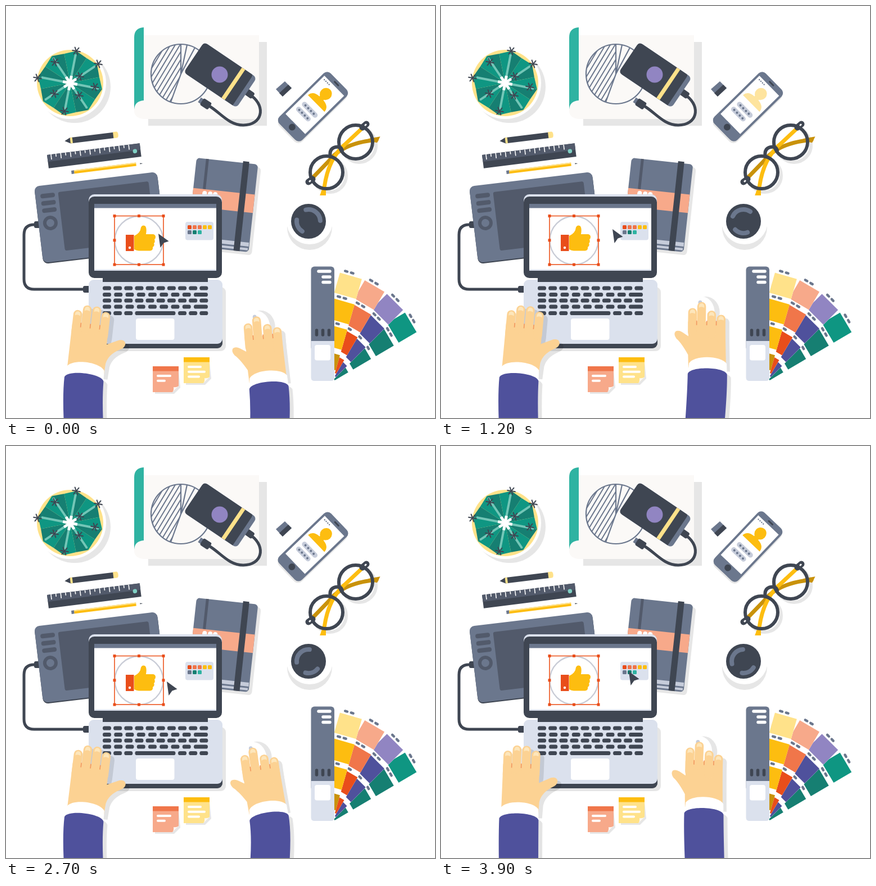
Recreate the animation shown at these times as an HTML page. Size 763 by 733 pixels, loop 4 s.

```html
<!DOCTYPE html>
<html lang="en">
<head>
<meta charset="utf-8">
<title>Designer's desk</title>
<style>
  html, body { margin: 0; width: 100%; height: 100%; overflow: hidden; background: #fff; }
  svg { display: block; }
  .dark { fill: #3f4652; } .slate { fill: #6b778d; } .mid { fill: #525a6b; }
  .light { fill: #dbe1ed; } .white { fill: #fff; } .gold { fill: #fdbd10; } .cream { fill: #ffe28a; }
  .red { fill: #e94e1b; } .orange { fill: #f0764a; } .salmon { fill: #f7a98a; }
  .shade { fill: #e6e6e6; } .skin { fill: #fcd293; } .navy { fill: #4f519c; } .lilac { fill: #9185c2; }
  .line { fill: none; stroke: #3f4652; stroke-linecap: round; }
</style>
</head>
<body>
<svg width="763" height="733" viewBox="0 0 763 733">
  <g id="plant"></g>

  <g id="paper">
    <path class="shade" d="M253 64H464V213H253Z"/>
    <path fill="#fbf9f7" d="M244 52H450V201H244Q228 199 228 186Q229 169 245 168Z"/>
    <path fill="#2fb3a2" d="M228 184V56Q228 39 245 38V168Q229 169 228 184Z"/>
    <g fill="none" stroke="#6b778d" stroke-width="2.2">
      <circle cx="311" cy="121" r="53"/>
      <clipPath id="slice"><path d="M311 121V68A53 53 0 0 0 293 171Z"/></clipPath>
      <path id="hatch" clip-path="url(#slice)" stroke-width="2"/>
      <path d="M293 171L311 121V68M311 121L322 69M311 121L336 74"/>
    </g>
  </g>

  <g id="drive">
    <path class="line" stroke-width="5" d="M437 160C463 180 455 212 422 212C396 212 382 190 360 177"/>
    <rect class="dark" x="-8" y="-6" width="16" height="12" rx="3" transform="translate(433 156) rotate(36)"/>
    <g transform="translate(355 174) rotate(33)">
      <rect class="slate" x="-13" y="-5" width="9" height="10"/>
      <rect class="dark" x="-8" y="-7" width="17" height="14" rx="3"/>
    </g>
    <g transform="translate(381 122) rotate(34)">
      <rect class="slate" x="-56" y="-32" width="113" height="65" rx="7"/>
      <path class="dark" d="M-49 -32H46Q49 -32 49 -26V33H-49Q-56 33 -56 26V-25Q-56 -32 -49 -32Z"/>
      <path class="cream" d="M25 -32H32V33H25Z"/>
    </g>
    <circle class="lilac" cx="380" cy="122" r="14.5"/>
  </g>
  <path class="slate" d="M496 134L508 146L492 161L480 148Z"/>
  <path class="dark" d="M508 146L492 161L486 155L502 140Z"/>

  <g id="phone">
    <rect x="-27" y="-61" width="58" height="128" rx="10" opacity=".1"/>
    <rect class="slate" x="-29" y="-64" width="58" height="128" rx="9"/>
    <rect class="white" x="-25" y="-53" width="50" height="97"/>
    <rect class="dark" x="-6" y="-60" width="12" height="3" rx="1.5"/>
    <circle class="dark" cy="52" r="6"/>
    <g id="avatar" class="gold">
      <ellipse cy="-32" rx="10.5" ry="11"/>
      <path d="M-5 -26H5V-21Q20 -20 21 -8H-21Q-20 -20 -5 -21Z"/>
    </g>
    <g id="fields"></g>
  </g>

  <g id="glasses" fill="none" stroke-linecap="round">
    <g stroke="#e6e6e6" stroke-width="6" transform="translate(6 6)">
      <circle cx="570" cy="296" r="29"/><circle cx="622" cy="242" r="30"/>
    </g>
    <circle class="white" cx="570" cy="296" r="28"/><circle class="white" cx="622" cy="242" r="29"/>
    <path stroke="#c9920a" stroke-width="7" d="M546 305L575 275Q598 244 659 238"/>
    <path stroke="#c9920a" stroke-width="4" d="M645 238L662 235L659 241Z"/>
    <path stroke="#fdbd10" stroke-width="7" d="M633 218L602 247Q570 275 565 333"/>
    <path stroke="#fdbd10" stroke-width="4" d="M567 318L561 335L567 335Z"/>
    <g stroke="#3f4652" stroke-width="6">
      <circle cx="570" cy="296" r="29"/><circle cx="622" cy="242" r="30"/>
      <path d="M577 268Q574 254 586 251Q596 249 598 257"/>
      <path stroke-width="11" d="M545 308L538 313M634 216L641 210"/>
    </g>
    <path stroke="#fff" stroke-width="3" d="M540 312l1 -1M639 212l1 -1"/>
  </g>

  <g id="cup">
    <circle class="shade" cx="540" cy="394" r="40"/>
    <circle class="white" cx="540" cy="383" r="41"/>
    <circle class="dark" cx="538" cy="383" r="31"/>
    <g id="lid" fill="none" stroke="#6b778d" stroke-width="8" stroke-linecap="round"></g>
  </g>

  <g transform="translate(152 234.5) rotate(-7)">
    <path class="dark" d="M-48 0L-38 -5H40V5.5H-38Z"/>
    <path class="cream" d="M-38 -5H-34V5.5H-38ZM39 -5.5H45Q48 -5 48 0Q48 5 45 5.5H39Z"/>
  </g>
  <g transform="translate(73 265) rotate(-7.2)">
    <path class="dark" d="M0 0H166V24H0Z"/><path class="mid" d="M0 0H166V12H0Z"/>
    <path id="ticks" stroke="#fff" stroke-width="1.6"/>
    <circle cx="156" cy="13" r="3.8" fill="#7fcfc3"/>
  </g>
  <g transform="translate(116 293) rotate(-7.2)">
    <path class="slate" d="M0 0H5V6H0Z"/><path class="gold" d="M5 0H116V6H5Z"/>
    <path class="cream" d="M5 0H116V2H5Z"/><path class="dark" d="M123 2L128 3L123 4Z"/>
  </g>

  <g id="tablet">
    <path class="line" stroke-width="5" d="M56 389H50Q32 389 32 407V486Q32 504 50 504H142"/>
    <rect class="dark" x="50" y="383" width="12" height="12" rx="3"/>
    <rect class="dark" x="137" y="498" width="14" height="12" rx="3"/>
    <g transform="translate(50 321) rotate(-6.8)">
      <rect class="dark" y="2" width="220" height="137" rx="9"/>
      <rect class="slate" width="220" height="137" rx="9"/>
      <rect class="mid" x="41" y="15" width="162" height="105" rx="3"/>
      <rect class="mid" x="9" y="15" width="26" height="8" rx="4"/>
      <rect class="mid" x="9" y="28" width="26" height="8" rx="4"/>
      <rect class="mid" x="9" y="41" width="26" height="8" rx="4"/>
      <circle cx="21" cy="68" r="10" fill="none" stroke="#525a6b" stroke-width="6"/>
    </g>
  </g>

  <g transform="translate(339 270) rotate(6.2)">
    <rect class="shade" x="8" y="5" width="108" height="157" rx="6"/>
    <rect class="slate" width="110" height="157" rx="6"/>
    <path fill="#c6ccda" d="M2 140H109V147H2ZM2 150H108V154H2Z"/>
    <path class="mid" d="M17 0H22V140H17Z"/>
    <path class="salmon" d="M0 54H110V87H0Z"/>
    <path fill="none" stroke="#fff" stroke-width="8" stroke-linecap="round" d="M21 61V66M31 61V66M40 61V66"/>
    <path class="dark" d="M83 -3H94V157H83Z"/>
  </g>

  <g id="laptop">
    <rect class="shade" x="160" y="500" width="231" height="114" rx="9"/>
    <rect class="dark" x="147" y="520" width="238" height="89" rx="9"/>
    <rect class="light" x="147" y="487" width="238" height="114" rx="9"/>
    <rect class="light" x="147" y="335" width="237" height="40" rx="10"/>
    <rect class="dark" x="147" y="339" width="237" height="145" rx="10"/>
    <path class="dark" d="M172 480H359V491H172Z"/>
    <path class="white" d="M157 352H374V471H157Z"/><path class="slate" d="M157 352H374V359.5H157Z"/>
    <path class="light" d="M157 468.5H374V471H157Z"/>
    <rect class="white" x="231" y="556" width="68.5" height="38" rx="4"/>
    <g id="keys" class="dark"></g>
    <circle cx="236.5" cy="417" r="43" fill="none" stroke="#c9ccd6" stroke-width="2.3"/>
    <path fill="none" stroke="#f0764a" stroke-width="2" d="M193 373.5H280V460H193Z"/>
    <g id="handles" class="red"></g>
    <path class="red" d="M213 407H227.500V436H213Z"/><circle class="white" cx="220" cy="430" r="2.2"/>
    <path class="gold" d="M228 409Q239 404 240 394Q242 389 247 391Q251 394 249 406H262Q266 407 266 411Q266 414 264 415Q266 420 263 422Q265 427 261 429Q262 435 256 435.5H236Q232 435 228 433Z"/>
    <rect class="light" x="319" y="384" width="50" height="32.5" rx="4"/>
    <g id="swatches"></g>
    <path id="cursor" class="dark" d="M0 0L18.500 13.500L9.500 16.500L3.500 25Z"/>
  </g>

  <g id="notes"></g>
  <g id="fan"></g>
  <g>
    <rect class="slate" x="542.5" y="463.5" width="41.5" height="150" rx="6"/>
    <path class="light" d="M542.5 596H584V661Q584 667 578 667H548.5Q542.5 667 542.5 661Z"/>
    <path fill="none" stroke="#fff" stroke-width="5.5" stroke-linecap="round" d="M556 472H576M564 482H576M564 491.5H576"/>
    <path class="line" stroke-width="5.5" d="M552.5 577V585M563.5 577V585M574.5 577V585"/>
    <rect class="white" x="549" y="603" width="28" height="27.5" rx="4"/>
  </g>
  <g id="arms"></g>
</svg>

<script>
const el = id => document.getElementById(id);
const range = (n, fn) => Array.from({ length: n }, (_, i) => fn(i)).join('');
const rect = (x, y, w, h, r, cls = '') =>
  `<rect class="${cls}" x="${x}" y="${y}" width="${w}" height="${h}" rx="${r}"/>`;
const path = (d, attrs) => `<path d="${d}" ${attrs}/>`;
const polar = (r, deg) => [r * Math.cos(deg * Math.PI / 180), r * Math.sin(deg * Math.PI / 180)];

// Cactus: eight lobes, each with a lit and a dark facet, a pale ridge and spines
const spines = [[125,80],[164,103],[158,144],[130,159],[104,187],[86,156],[56,128],[87,100],[131,125]];
const rim = i => polar(i % 2 ? 53 : 58, i * 22.5 - 79);
el('plant').innerHTML = `<circle class="shade" cx="122" cy="144" r="64"/><circle class="white" cx="114" cy="137" r="64"/>
  <circle class="cream" cx="114" cy="137" r="59"/><g transform="translate(114 137)">` +
  range(16, i => path(`M0 0L${rim(i)}L${rim(i + 1)}Z`, `fill="${i % 2 ? '#0f9682' : '#167f72'}"`)) +
  range(8, i => path(`M0 0L${polar(i % 2 ? 54 : 52, i * 45 - 79)}`, 'stroke="#73c6b7" stroke-width="4"')) +
  range(8, i => path(`M0 0L${polar(13, i * 45 - 79)}`, 'stroke="#fff" stroke-width="5"')) + '</g>' +
  range(spines.length, i => `<g transform="translate(${spines[i]})">` +
    range(3, k => path('M-7 0H7', `class="line" stroke-width="2" transform="rotate(${k * 60 + 10})"`)) + '</g>');

el('hatch').setAttribute('d', range(22, i => `M${195 + i * 8.5} 175l66 -110`));
el('ticks').setAttribute('d', range(17, i => `M${7 + i * 8.7} 0v${i % 2 ? 5 : 9}`));

el('fields').innerHTML = range(2, r => rect(-18 - r, 3.5 + r * 13.5, 36 - r * 3, 9, 4.5) +
  range(4, i => `<circle class="slate" cx="${-11 - r * 2 + i * 7}" cy="${8 + r * 13.5}" r="2"/>`)) +
  range(4, i => `<circle class="slate" cx="${-20 + i * 4}" cy="-48" r="1.2"/>`);
el('fields').setAttribute('fill', '#c6ccda');

const arc = (from, to) => path(`M${polar(21, from)}A21 21 0 0 1 ${polar(21, to)}`, '');
el('lid').innerHTML = arc(-185, -85) + arc(40, 105);

// Rows two and four end in a wide key, the last row has the space bar
el('keys').innerHTML = [502, 513.5, 524, 535, 546.5].map((y, r) => {
  const wide = r % 2, pitch = wide ? 20.25 : 19.15;
  return range(wide ? 9 : 10, i => {
    if (r == 4 && i > 3 && i < 7) return '';
    const w = r == 4 && i == 3 ? 72 : wide && i == 8 ? 25 : 15;
    return rect(172 + i * pitch, y - 3.6, w, 7.2, 3.4);
  });
}).join('');

el('handles').innerHTML = range(9, i => i == 4 ? '' :
  rect(190.5 + i % 3 * 43.5, 371 + Math.floor(i / 3) * 43.3, 5, 5, 0));
el('swatches').innerHTML = ['#e94e1b', '#f0764a', '#f0764a', '#fdbd10', '#fdbd10', '#6b778d', '#167f72', '#2fb3a2']
  .map((c, i) => `<rect x="${323 + i % 5 * 9}" y="${i < 5 ? 390 : 399}" width="7" height="7" rx="1.5" fill="${c}"/>`).join('');

const note = (x, y, body, strip, lines) => `<g transform="translate(${x} ${y})">
  <path class="shade" d="M4 8H46L49 38L38 49H4Z"/>
  <path class="${body}" d="M0 0H46V35L35 46H0Z"/><path class="${strip}" d="M0 0H46V8.5H0Z"/>
  <path fill="#fbf9f7" d="M46 35L35 46Q38 42 37 37Q42 38 46 35Z"/>` +
  lines.map((w, i) => path(`M9 ${17 + i * 8.7}h${w}`, 'stroke="#fff" stroke-width="4" stroke-linecap="round"')).join('') + '</g>';
el('notes').innerHTML = note(261, 641, 'salmon', 'orange', [22, 12]) + note(316, 625, 'cream', 'gold', [21, 28, 18]);

// Colour fan: four strips around one pivot, the steepest on top
const strips = [
  [59.5, '#0f9682', '#167f72', '#167f72', '#167f72'], [45, '#9185c2', '#4f519c', '#4f519c', '#4f519c'],
  [30.5, '#f7a98a', '#f0764a', '#e94e1b', '#e94e1b'], [16, '#ffe28a', '#fdbd10', '#fdbd10', '#c9920a']];
el('fan').innerHTML = strips.map(([deg, ...colors]) => `<g transform="translate(563 655) rotate(${deg})">
  ${rect(-20, -194, 40.5, 194, 4, 'white')}` +
  colors.map((c, i) => `<rect x="-20" y="${-182 + i * 47}" width="40.5" height="${i == 3 ? 28 : 37}" fill="${c}"/>` +
    path(`M-12 ${-187.5 + i * 47}h4M-1 ${-187.5 + i * 47}h4`, 'stroke="#6b778d" stroke-width="4.5" stroke-linecap="round"')).join('') + '</g>').join('');

// Arms: a rigid hand at the wrist and a sleeve that bends towards the bottom edge
const hands = [
  { wrist: [138, 650], palm: 'M106 567H171V598L192 588Q203 585 204 594Q203 601 196 604Q176 615 173 632L172 655H106Z',
    fingers: [[106, 543], [122, 533], [139, 533], [156, 541]], under: '' },
  { wrist: [472, 652], palm: 'M436 573H502L505 655H438L437 632Q424 610 416 604Q410 596 414 591Q419 588 426 592L437 599Z',
    fingers: [[436, 549], [452, 538], [470, 553], [487, 560]],
    under: `<ellipse class="shade" cx="467" cy="556" rx="25" ry="28"/><ellipse class="white" cx="460" cy="557" rx="23" ry="29"/>
      <ellipse cx="457" cy="539" rx="3.5" ry="4" fill="#c6ccda"/>` }];
el('arms').innerHTML = hands.map(({ wrist: [x, y], palm, fingers, under }) => {
  const shape = path(palm, '') + fingers.map(([fx, fy]) => rect(fx, fy, 15.5, 50, 7.5)).join('');
  return `<g class="arm">
    <g opacity=".1" transform="translate(7 6)"><path class="sleeve"/><g class="hand">${shape}</g></g>
    <g class="hand">${under}<g class="skin">${shape}</g>` +
    fingers.map(([fx, fy], i) => `<path fill="#fde6bb" d="M${fx + 3} ${fy + 10}v-3a4.7 4.7 0 0 1 9.4 0v3q-4.7 -3 -9.4 0Z"/>` +
      (i ? path(`M${fx - .7} ${fingers[0][1] + 22}v8`, 'stroke="#f2975f" stroke-width="1.6"') : '')).join('') +
    path(`M${x - 35} ${y + 16}L${x - 33} ${y - 5}C${x - 24} ${y - 20} ${x + 24} ${y - 20} ${x + 34} ${y - 5}L${x + 35} ${y + 16}Z`, 'class="white"') +
    `</g><path class="sleeve navy"/></g>`;
}).join('');
const arms = [...document.querySelectorAll('.arm')];

function poseArm(i, dx, dy, deg, foot) {
  const [x, y] = hands[i].wrist, a = deg * Math.PI / 180, c = Math.cos(a), s = Math.sin(a);
  const at = (u, v) => `${x + dx + u * c - v * s} ${y + dy + u * s + v * c} `;
  const d = `M${foot} 745Q${at(-35, 45)}${at(-35, 14)}C${at(-31, 0)}${at(31, 0)}${at(35, 14)}Q${at(36, 45)}${foot + 70} 745Z`;
  arms[i].querySelectorAll('.sleeve').forEach(p => p.setAttribute('d', d));
  arms[i].querySelectorAll('.hand').forEach(g =>
    g.setAttribute('transform', `translate(${dx} ${dy}) rotate(${deg} ${x} ${y})`));
}

// Smooth curve through the poses
const times = [0, 400, 1200, 2000, 2700, 3200, 3900];
const tracks = {
  handX: [-5.5, 0, 2, -7, -6, -4, -4],
  handY: [13, 0, -11, -0.5, -4, -7.5, -11.5],
  handTurn: [-4.7, 0, 1, -9, -8, -1.5, 2],
  leftTurn: [6.6, 8.8, 5.4, 0, 7, 8.6, 2.4],
  cursorX: [271, 299, 305, 261, 286, 327, 334],
  cursorY: [405, 396, 397, 423, 419, 407, 401],
  phone: [0, 2.2, 0, -2, 0.7, -2, -2],
  avatar: [1, 0.13, 0.4, 0.86, 1, 0.2, 1],
  lid: [82, 55, 30, 5, 0, 0, -8]
};
function sample(v, t) {
  const i = Math.max(0, times.findLastIndex(k => k <= t));
  if (i == times.length - 1) return v[i];
  const slope = j => v[j - 1] === undefined || v[j + 1] === undefined ? 0 : (v[j + 1] - v[j - 1]) / (times[j + 1] - times[j - 1]);
  const h = times[i + 1] - times[i], u = (t - times[i]) / h, w = 1 - u;
  return v[i] * w * w * (1 + 2 * u) + v[i + 1] * u * u * (3 - 2 * u) + h * u * w * (slope(i) * w - slope(i + 1) * u);
}

function draw() {
  const t = Math.floor(performance.now() % 4000 / 100) * 100;
  const p = {};
  for (const name in tracks) p[name] = sample(tracks[name], t);
  poseArm(0, p.leftTurn * 0.3 + 0.3, 0, p.leftTurn, 103);
  poseArm(1, p.handX, p.handY, p.handTurn, 434);
  el('cursor').setAttribute('transform', `translate(${p.cursorX} ${p.cursorY})`);
  el('phone').setAttribute('transform', `translate(546 179) rotate(${45.5 + p.phone})`);
  el('avatar').setAttribute('opacity', Math.min(1, Math.max(0, p.avatar)));
  el('lid').setAttribute('transform', `translate(538 383) rotate(${p.lid})`);
  requestAnimationFrame(draw);
}
draw();
</script>
</body>
</html>
```
